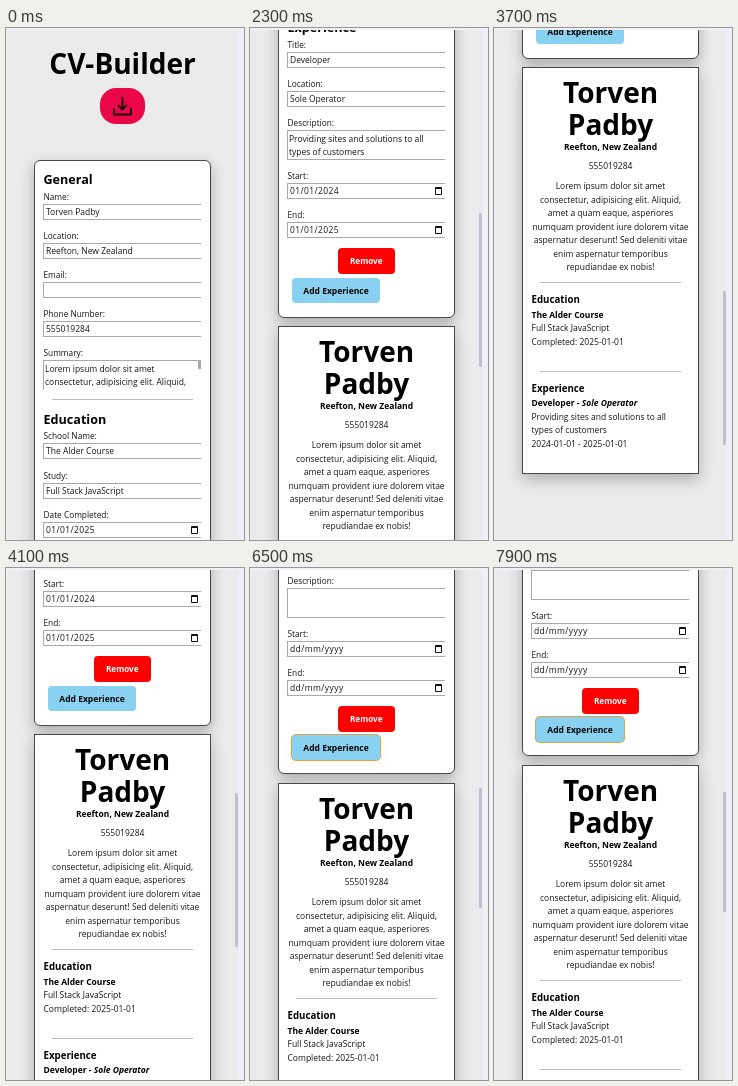
An HTML page that plays this animation: 238 by 512 pixels, repeating every 8000 ms.

```html
<!DOCTYPE html>
<html lang="en">
<head>
<meta charset="utf-8">
<title>CV-Builder</title>
<style>
@property --on { syntax: "<integer>"; inherits: true; initial-value: 0; }

html, body { margin: 0; width: 100%; height: 100%; overflow: hidden; background: #eff0fa; }
body { position: relative; font: 8.5px/14px "Open Sans", "Noto Sans", sans-serif; color: #161616; }
.view, .view * { position: absolute; box-sizing: border-box; }
.view {
  --scroll: 0;
  left: 0; top: 0; width: 238px; height: 512px;
  clip-path: inset(2px 5px 0 1px);
  background: #ebebeb;
  animation: add 8s step-end infinite;
}
.page { left: 0; top: 0; width: 233px; height: 2200px; transform: translateY(calc(var(--scroll) * -1px)); }
.card { left: 28px; width: 177px; background: #fff; border: 1px solid #484848; box-shadow: 0 5px 14px rgba(0, 0, 0, .27); }
.form { top: 132px; height: calc(766px + var(--on) * 234px); border-radius: 6px; }
.extra { opacity: var(--on); }
.tail { top: calc(var(--on) * 235px); }
.preview { left: 0; top: calc(906px + var(--on) * 235px); width: 233px; }
.preview .card { top: 0; height: calc(407px + var(--on) * 40px); }

.text { margin-top: -7px; white-space: pre; }
.mid { left: 0; width: 233px; text-align: center; }
.bold, .head, .sub, .title, .btn { font-weight: 700; color: #000; }
.label { font-size: 8.3px; }
.head { font-size: 12.6px; }
.sub { font-size: 9.7px; }
.title { font-size: 28px; }
.date { letter-spacing: .4px; }
.text i { position: static; }

.box { left: 37px; width: 158px; height: 16px; background: #fff; border: 1px solid #a9a9a9; border-right: 0; }
.area { height: 30px; }
.open { border-bottom: 0; }
.bar { left: 192px; width: 3px; height: 9px; background: #a9a9a9; }
.cal { left: 185px; width: 7px; height: 8px; border: 1px solid #111; border-top-width: 2px; border-radius: 1px; }
.line { left: 46px; width: 141px; height: 1px; background: #bdbdbd; }

.btn { height: 25px; line-height: 25px; border-radius: 4px; text-align: center; white-space: pre; }
.remove { left: 88px; width: 56.5px; height: 25.5px; background: #f00; color: #fff; font-size: 8.2px; }
.add { left: 42px; background: #89d1f1; }
.focus { animation: focus 8s linear infinite; }
.load { left: 94px; top: 60px; width: 45px; height: 36px; border-radius: 16px; background: #e9074a; }
.load svg { left: 12px; top: 8px; }

.thumb {
  left: 229px; width: 3px; border-radius: 1px; background: #bfc1d0;
  top: calc(2px + var(--scroll) * (.301px - var(--on) * .066px));
  height: calc(154px - var(--on) * 34px);
  animation: thumb 8s step-end infinite;
}

@keyframes add { 0% { --on: 0; } 62.5%, 100% { --on: 1; } }
@keyframes thumb {
  0% { opacity: 0; }
  13.75% { opacity: 1; }
  56.25% { opacity: .5; }
  58.75% { opacity: 0; }
  80%, 100% { opacity: 1; }
}
@keyframes focus {
  0%, 61.24% { box-shadow: 0 0 0 1px transparent, 0 0 0 transparent; }
  61.25% { box-shadow: 0 0 0 1px #dca544, 0 0 0 transparent; }
  68.75%, 80% { box-shadow: 0 0 0 1px #dca544, 0 4px 12px rgba(220, 165, 68, .2); }
  85%, 100% { box-shadow: 0 0 0 1px #dca544, 0 0 0 transparent; }
}
</style>
</head>
<body>
<div class="view">
  <div class="page">
    <div class="load">
      <svg width="21" height="20" viewBox="0 0 21 20" fill="none" stroke="#180008" stroke-width="1.8" stroke-linejoin="round">
        <path d="M10.5 1v12M6 9l4.500 4.500L15 9M2 12v6.500h17V12"/>
      </svg>
    </div>
    <div class="card form"></div>
    <div class="main"></div>
    <div class="extra"></div>
    <div class="tail"></div>
    <div class="preview"><div class="card"></div></div>
  </div>
  <div class="thumb"></div>
</div>
<script>
const $ = s => document.querySelector(s);
const view = $(".view"), page = $(".page"), main = $(".main");
const extra = $(".extra"), tail = $(".tail"), preview = $(".preview");
const person = ["Torven", "Padby"], place = "Reefton, New Zealand", phone = "555019284";
const school = "The Alder Course", study = "Full Stack JavaScript", work = "Sole Operator";
const job = ["Providing sites and solutions to all", "types of customers"];
const summary = [
  "Lorem ipsum dolor sit amet",
  "consectetur, adipisicing elit. Aliquid,",
  "amet a quam eaque, asperiores",
  "numquam provident iure dolorem vitae",
  "aspernatur deserunt! Sed deleniti vitae",
  "enim aspernatur temporibus",
  "repudiandae ex nobis!"
];

function put(to, cls, top, html = "") {
  const el = document.createElement("div");
  el.className = cls;
  el.style.top = top + "px";
  el.innerHTML = html;
  to.append(el);
  return el;
}
function text(to, y, str, cls = "", x = 37.5) {
  const el = put(to, "text " + cls, y, str);
  if (!cls.includes("mid")) el.style.left = x + "px";
}
function field(to, y, label, value = "", cls = "") {
  text(to, y, label + ":", "label");
  put(to, "box", y + 7);
  text(to, y + 15, value, cls, 40);
}
function date(to, y, label, value) {
  field(to, y, label, value, "date");
  put(to, "cal", y + 11);
}
function area(to, y, label, lines, cls = "") {
  text(to, y, label + ":", "label");
  put(to, "box area " + cls, y + 7);
  lines.forEach((s, i) => text(to, y + 16 + i * 13, s, "", 39));
}
function addButton(to, y, label, width, cls = "") {
  put(to, "btn add " + cls, y, label).style.width = width + "px";
}
function experience(to, y, title, where, lines, start, end) {
  field(to, y, "Title", title);
  field(to, y + 39, "Location", where);
  area(to, y + 78, "Description", lines);
  date(to, y + 131, "Start", start);
  date(to, y + 170, "End", end);
  put(to, "btn remove", y + 203, "Remove");
}

text(page, 35, "CV-Builder", "title mid");

text(main, 152, "General", "head");
field(main, 169, "Name", person.join(" "));
field(main, 208, "Location", place);
field(main, 247, "Email");
field(main, 286, "Phone Number", phone);
area(main, 325, "Summary", summary.slice(0, 2), "open");
put(main, "bar", 332);
put(main, "line", 371);

text(main, 392, "Education", "head");
field(main, 408, "School Name", school);
field(main, 448, "Study", study);
date(main, 487, "Date Completed", "01/01/2025");
put(main, "btn remove", 519, "Remove");
addButton(main, 549, "Add Education", 83);
put(main, "line", 587);

text(main, 608, "Experience", "head");
experience(main, 625, "Developer", work, job, "01/01/2024", "01/01/2025");
experience(extra, 861, "", "", [], "dd/mm/yyyy", "dd/mm/yyyy");
addButton(tail, 858, "Add Experience", 88, "focus");

person.forEach((s, i) => text(preview, 25 + i * 32, s, "title mid"));
text(preview, 80, place, "bold mid");
text(preview, 99, phone, "mid");
summary.forEach((s, i) => text(preview, 119 + i * 13.5, s, "mid"));
put(preview, "line", 215);
text(preview, 233, "Education", "sub");
text(preview, 248, school, "bold");
text(preview, 261, study);
text(preview, 275, "Completed: 2025-01-01");
put(preview, "line", 304);
text(preview, 322, "Experience", "sub");
text(preview, 336, `Developer - <i>${work}</i>`, "bold");
job.forEach((s, i) => text(preview, 350 + i * 13, s));
text(preview, 377, "2024-01-01 - 2025-01-01");
text(preview, 403, "-", "bold extra");
text(preview, 417, "-", "extra");

// each flick: start in ms, number of 100 ms steps, resting position
const loop = 8000, step = 100;
const flicks = [
  [1100, 3, 130], [1500, 4, 344], [2000, 8, 872], [2900, 3, 949],
  [3500, 7, 740], [6400, 4, 1112], [7100, 6, 960], [7900, 1, 944]
];
const ease = k => k * k * (3 - 2 * k);

function scrollAt(t) {
  let y = 0;
  for (const [start, steps, to] of flicks) {
    const done = Math.floor((t - start) / step) + 1;
    y += (to - y) * ease(Math.min(Math.max(done / steps, 0), 1));
  }
  return Math.round(y);
}
function draw(now) {
  view.style.setProperty("--scroll", scrollAt(now % loop));
  requestAnimationFrame(draw);
}
requestAnimationFrame(draw);
</script>
</body>
</html>
```
